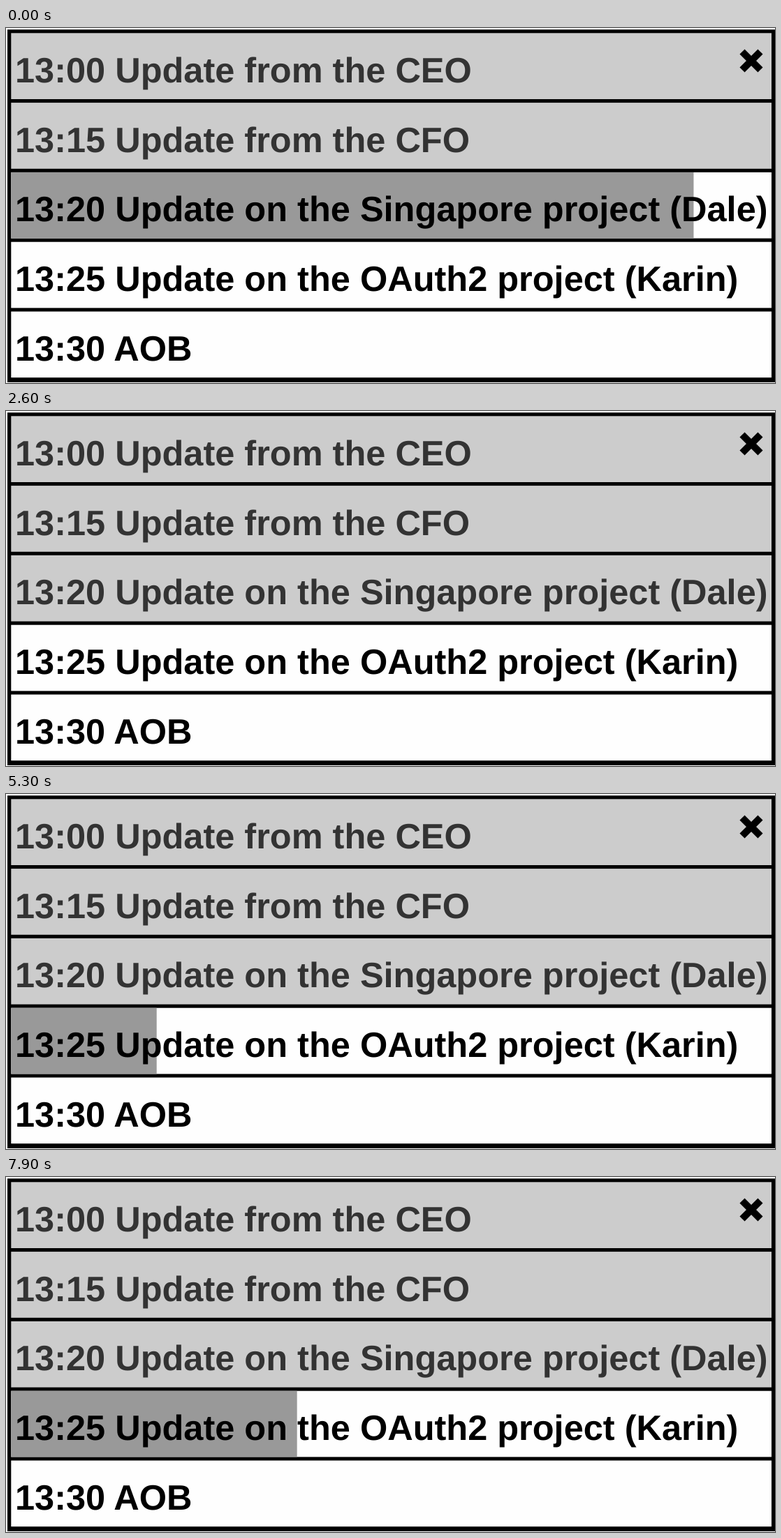
These frames come from a looping animation (1101x509 px, 8 s). An HTML page with a canvas:

```html
<!DOCTYPE html>
<html lang="en">
<head>
<meta charset="utf-8">
<title>Agenda</title>
<style>
  html, body { margin: 0; width: 100%; height: 100%; overflow: hidden; background: #fefefe; }
  canvas { display: block; }
</style>
</head>
<body>
<canvas id="stage" width="1101" height="509"></canvas>
<script>
const ctx = document.getElementById("stage").getContext("2d");
const LOOP = 8000, STEP = 100;
const LEFT = 7.3, RIGHT = 1096, TOP = 2.2, PITCH = 99.8, LINE = 5.1;
const SLOW = 0.0381, FAST = 0.0773;
const SPEED_UP = 2300, NEXT_ITEM = 2600;
const items = [
  "13:00 Update from the CEO",
  "13:15 Update from the CFO",
  "13:20 Update on the Singapore project (Dale)",
  "13:25 Update on the OAuth2 project (Karin)",
  "13:30 AOB"
];

function box(color, x, y, right, bottom) {
  ctx.fillStyle = color;
  ctx.fillRect(x, y, right - x, bottom - y);
}

// Right edge of the bar in the running item
function barEnd(t) {
  if (t >= NEXT_ITEM) return 7 + FAST * (t - NEXT_ITEM);
  return 984.5 + SLOW * Math.min(t, SPEED_UP) + FAST * Math.max(0, t - SPEED_UP);
}

function drawItem(text, i, current, end) {
  const y = TOP + PITCH * i + LINE;
  const bottom = TOP + PITCH * (i + 1);
  const done = i < current;
  box(done ? "#ccc" : "#fefefe", LEFT, y, RIGHT, bottom);
  if (i === current && end > LEFT) box("#999", LEFT, y, Math.min(end, RIGHT), bottom);
  ctx.fillStyle = done ? "#333" : "#000";
  ctx.fillText(text, 13, 77.7 + PITCH * i);
}

function drawCross(x, y, r) {
  ctx.lineWidth = 10;
  ctx.strokeStyle = "#000";
  ctx.beginPath();
  ctx.moveTo(x - r, y - r);
  ctx.lineTo(x + r, y + r);
  ctx.moveTo(x + r, y - r);
  ctx.lineTo(x - r, y + r);
  ctx.stroke();
}

function draw(time) {
  const t = Math.floor((time % LOOP) / STEP) * STEP;
  const current = t < NEXT_ITEM ? 2 : 3;
  box("#fefefe", 0, 0, 1101, 509);
  box("#000", 2, TOP, 1101, 508);
  ctx.font = "bold 50.5px 'Liberation Sans', Arial, sans-serif";
  ctx.fontKerning = "normal";
  ctx.textRendering = "geometricPrecision";
  items.forEach((text, i) => drawItem(text, i, current, barEnd(t)));
  drawCross(1067, 47, 13);
}

let start;
function tick(now) {
  if (start === undefined) start = now;
  draw(now - start);
  requestAnimationFrame(tick);
}
draw(0);
requestAnimationFrame(tick);
</script>
</body>
</html>
```
